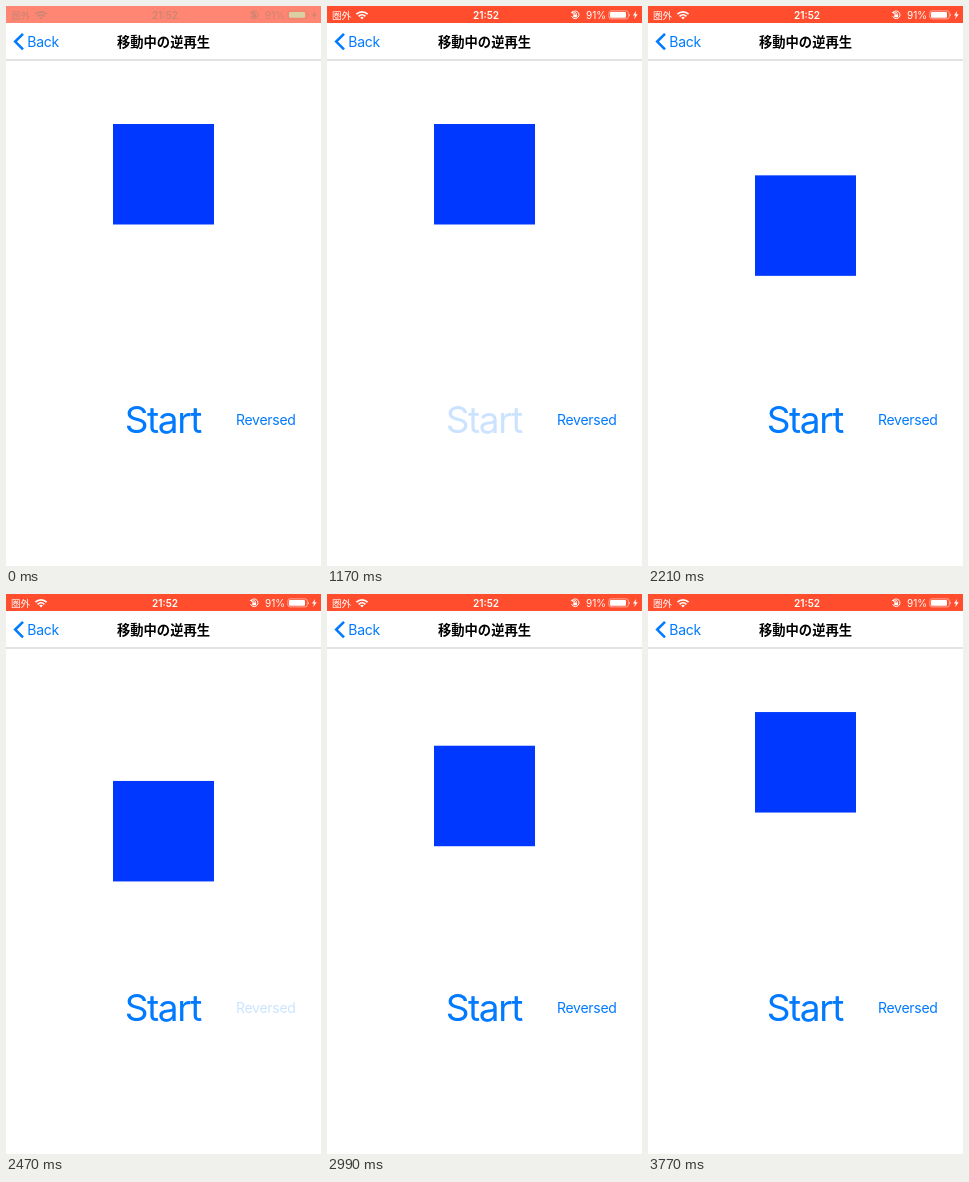
An HTML page that plays this animation: 315x560 px, repeating every 3900 ms.

```html
<!DOCTYPE html>
<html lang="ja">
<head>
<meta charset="utf-8">
<style>
  html, body { margin: 0; width: 100%; height: 100%; overflow: hidden; background: #fff; }
  svg { display: block; width: 100vw; height: 100vh; --lit: 100%;
        --ink: color-mix(in srgb, #fff var(--lit), #cb8574);
        --cell: color-mix(in srgb, #fff var(--lit), #d8cfa2); }
  text { font-family: Inter, "Noto Sans CJK JP", "Noto Sans CJK", sans-serif; font-optical-sizing: none; }
  .mid { text-anchor: middle; }
  .link { fill: #007aff; font-size: 14px; letter-spacing: -.28px; }
  .status { fill: var(--ink); font-size: 10px; }
  .line { fill: none; stroke: var(--ink); }
  #bar { fill: color-mix(in srgb, #ff4d2d var(--lit), #ff8672); }
</style>
</head>
<body>
<svg id="stage" viewBox="0 0 315 560">
  <rect width="315" height="560" fill="#fff"/>
  <rect id="bar" width="315" height="17"/>
  <g class="status">
    <text x="5" y="12.6" font-size="9.6">圏外</text>
    <g class="line" stroke-width="1.7">
      <path d="M29.4 8.2a8 8 0 0 1 11.2 0M31.6 10.3a4.9 4.9 0 0 1 6.8 0"/>
    </g>
    <path d="M35 13.4l-1.8-1.8a2.6 2.6 0 0 1 3.6 0z"/>
    <text class="mid" x="159" y="12.6" font-weight="600">21:52</text>
    <path class="line" stroke-width="1" d="M245.3 6.3a3.8 3.8 0 1 1-.7 3.8M247 8.6v-.8a1.2 1.2 0 0 1 2.4 0v.8"/>
    <path d="M243.6 6.2l2.9-1v3zM246.3 8.4h3.8v2.8h-3.8z"/>
    <text x="259" y="12.6">91%</text>
    <rect class="line" x="281.9" y="4.9" width="19.4" height="8" rx="2" stroke-width=".7" opacity=".75"/>
    <rect x="283" y="6" width="16" height="5.8" rx="1" fill="var(--cell)"/>
    <path d="M302.2 7.4q1.5 1.5 0 3zM309.2 4.8l-3.2 4.7h2l-.9 3.7 3.6-4.9h-2.2z"/>
  </g>
  <rect y="53.5" width="315" height="1" fill="#c6c6c8"/>
  <path d="M17 27.8L9.2 35.6 17 43.4" fill="none" stroke="#007aff" stroke-width="2.6"/>
  <text class="link" x="21.3" y="40.7">Back</text>
  <text class="mid" x="157.5" y="40.7" font-size="13.3" font-weight="700">移動中の逆再生</text>
  <rect id="box" x="107" y="118" width="101" height="100.5" fill="#0038ff"/>
  <text id="start" class="mid" x="156.8" y="427.4" fill="#007aff" font-size="37" letter-spacing="-1.5">Start</text>
  <text id="reversed" class="link mid" x="259.8" y="419">Reversed</text>
</svg>
<script>
const LOOP = 3900, STEP = 130;
const PRESS = 1170, TURN = 2487, DURATION = 1840, TRAVEL = 84;
const $ = id => document.getElementById(id);
const clamp = v => Math.min(1, Math.max(0, v));

// cubic-bezier(.42, 0, .58, 1)
function easeInOut(x) {
  let lo = 0, hi = 1, u = .5;
  for (let i = 0; i < 24; i++) {
    u = (lo + hi) / 2;
    const bx = 1.26 * u * (1 - u) ** 2 + 1.74 * u * u * (1 - u) + u ** 3;
    if (bx < x) lo = u; else hi = u;
  }
  return u * u * (3 - 2 * u);
}

// A tapped button dims at once, then fades back after release.
const buttonAlpha = (t, down, up) => t < down ? 1 : .2 + .8 * clamp((t - up) / 350);

function draw(now) {
  const t = Math.floor(now % LOOP / STEP) * STEP;
  const elapsed = (t < TURN ? t : 2 * TURN - t) - PRESS;
  $("box").setAttribute("y", 118 + TRAVEL * easeInOut(clamp(elapsed / DURATION)));
  $("start").setAttribute("opacity", buttonAlpha(t, PRESS, PRESS));
  $("reversed").setAttribute("opacity", buttonAlpha(t, 2470, TURN));
  $("stage").style.setProperty("--lit", clamp(t / 260) * 100 + "%");
}

const origin = performance.now();
function tick() {
  draw(performance.now() - origin);
  requestAnimationFrame(tick);
}
tick();
</script>
</body>
</html>
```
